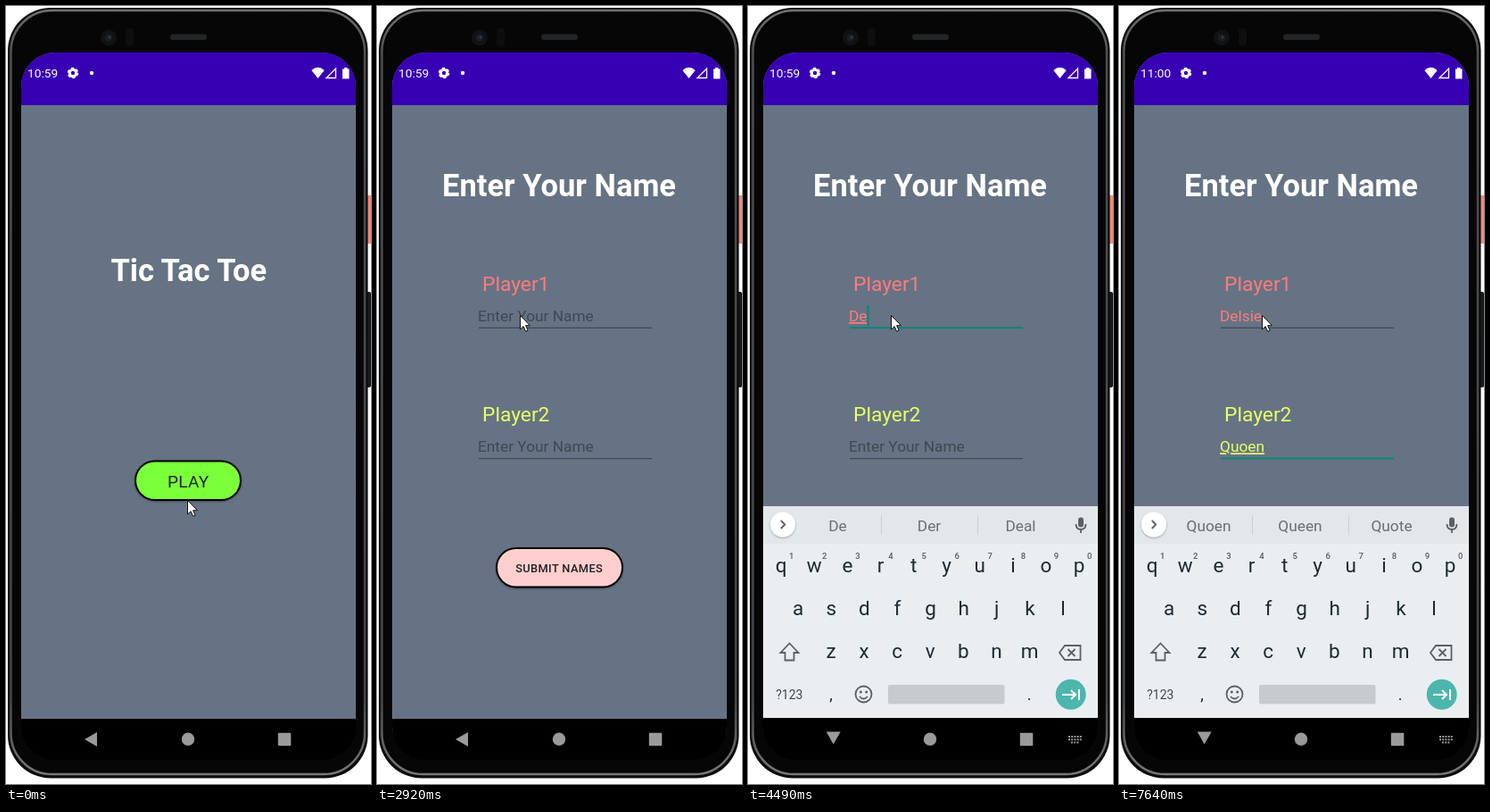
An HTML page for the animation above (8000 ms loop, 409x871 px).

```html
<!DOCTYPE html>
<html lang="en">
<head>
<meta charset="utf-8">
<title>Tic Tac Toe</title>
<style>
  html, body { margin: 0; width: 100%; height: 100%; overflow: hidden; background: #fff; }
  svg { display: block; width: 409px; height: 871px; font-family: Roboto, sans-serif; }
  .mid, .keys text { text-anchor: middle; }
  .title { font-size: 34.5px; font-weight: 700; fill: #fff; text-anchor: middle; }
  .label { font-size: 22.8px; }
  .entry, .hints { font-size: 17.3px; }
  .hint { fill: #3f4853; }
  .keys { font-size: 22.5px; fill: #1d2a31; }
  .keys .sup { font-size: 9.5px; font-weight: 500; fill: #555d62; }
  .keys .mark { font-size: 18px; }
  .icon { fill: none; stroke: #596166; stroke-width: 1.8; }
  .fillIcon { fill: #596166; stroke: none; }
  .hints { fill: #687075; }
  .window { transform-origin: 204.5px 433px; }
  .nav { fill: #9a9a9a; }
</style>
</head>
<body>
<svg viewBox="0 0 409 871">
  <defs>
    <linearGradient id="rim" x2="0" y2="1">
      <stop stop-color="#6d7173"/><stop offset=".06" stop-color="#4b4f52"/>
      <stop offset=".9" stop-color="#43474a"/><stop offset="1" stop-color="#777"/>
    </linearGradient>
    <clipPath id="screen"><rect x="17" y="52" width="375" height="792" rx="38"/></clipPath>
    <filter id="shadow" x="-20%" y="-20%" width="140%" height="160%">
      <feDropShadow dx="0" dy="1" stdDeviation=".9" flood-opacity=".35"/>
    </filter>
    <g id="backdrop">
      <path fill="#667384" d="M17 52h375v746H17z"/>
      <path fill="#3700b3" d="M17 52h375v59H17z"/>
      <path d="M17 798h375v46H17z"/>
    </g>
  </defs>

  <!-- phone body -->
  <rect x="404" y="212" width="6" height="54" rx="1" fill="#f28b78"/>
  <rect x="403" y="320" width="6" height="107" rx="2" fill="#17191a"/>
  <rect x="2" y="2" width="403.500" height="862.500" rx="48" fill="#0b0c0d"/>
  <rect x="5.500" y="5" width="396.500" height="855" rx="46" fill="#060606" stroke="url(#rim)" stroke-width="2.500"/>
  <rect x="17" y="52" width="375" height="792" rx="38"/>
  <circle cx="115" cy="35.500" r="9" fill="#111214"/>
  <circle cx="115" cy="35.500" r="4" fill="#1b1e23"/>
  <circle cx="116" cy="35" r="1.500" fill="#363b43"/>
  <rect x="134" y="25" width="9" height="20" rx="4" fill="#0e0e0f"/>
  <rect x="184" y="31.500" width="41" height="6.500" rx="3.200" fill="#222425"/>

  <g clip-path="url(#screen)">
    <g id="home" class="window">
      <use href="#backdrop"/>
      <text class="title" x="204.800" y="308">Tic Tac Toe</text>
      <rect x="145" y="509.500" width="118" height="43.500" rx="21.700" fill="#7bff3b" stroke="#000" stroke-width="2" filter="url(#shadow)"/>
      <text class="mid" x="204.200" y="538.800" font-size="19" fill="#20231f" letter-spacing=".3">PLAY</text>
    </g>
    <g id="form" class="window">
      <use href="#backdrop"/>
      <text class="title" x="204" y="213">Enter Your Name</text>
      <g id="fields"></g>
      <rect x="134" y="607" width="141" height="43.500" rx="21.700" fill="#ffcfcf" stroke="#000" stroke-width="2" filter="url(#shadow)"/>
      <text class="mid" x="204.200" y="633.800" font-size="12.800" font-weight="500" fill="#241f22" letter-spacing=".4">SUBMIT NAMES</text>
    </g>

    <g fill="#fff">
      <text id="clock" x="24" y="80.200" font-size="13.700"></text>
      <circle cx="75" cy="75" r="3.700" fill="none" stroke="#fff" stroke-width="3"/>
      <circle cx="75" cy="75" r="5.300" fill="none" stroke="#fff" stroke-width="2" stroke-dasharray="3.200 2.350"/>
      <circle cx="96" cy="75" r="2.200"/>
      <path d="M342.300 72Q349.500 65.500 356.700 72L349.500 81z"/>
      <path d="M369.500 70v10.500H359z" fill="none" stroke="#fff" stroke-width="1.300"/>
      <path d="M379 69h3.500v1.500h2v11h-7.500v-11h2z"/>
    </g>

    <g id="keyboard" class="keys">
      <path d="M17 797h375v47H17z" fill="#000"/>
      <path fill="#eaeef1" d="M17 560h375v237H17z"/>
      <path fill="#e3e7ea" d="M17 560h375v42H17z"/>
      <g id="letters"></g>
      <text x="46.300" y="776" font-size="14" fill="#40494f">?123</text>
      <text class="mark" x="93" y="777">,</text>
      <text class="mark" x="315" y="777">.</text>
      <rect x="157" y="760" width="130.500" height="21.500" rx="2" fill="#c7cbce"/>
      <g class="icon">
        <path d="M46.500 713.500l10 10.500h-5v8.500h-10V724h-5z"/>
        <path d="M355 716h17.500v16H355l-6-8zM358.500 720l8 8m0-8l-8 8"/>
        <circle cx="129.500" cy="770.500" r="9"/>
        <path d="M125 773q4.500 5 9 0"/>
        <circle class="fillIcon" cx="126.300" cy="768" r="1.500"/>
        <circle class="fillIcon" cx="132.700" cy="768" r="1.500"/>
        <rect class="fillIcon" x="370" y="572.500" width="6" height="11" rx="3"/>
        <path d="M367.500 580q0 6 5.500 6t5.500-6M373 586v4"/>
      </g>
      <circle cx="361.700" cy="770.700" r="17" fill="#4db6ac"/>
      <path d="M352 771h15m-5-5l5 5-5 5M371 765v12" fill="none" stroke="#fff" stroke-width="2"/>
      <circle cx="39" cy="580.500" r="14" fill="#fff" filter="url(#shadow)"/>
      <path id="chevron" class="icon" d="M36.800 576l4.500 4.500-4.500 4.500"/>
      <g id="tools" class="icon">
        <circle cx="87" cy="579" r="5"/><path d="M90.500 583l6 6"/>
        <path d="M138 574h11v9l-5 5h-8v-12q0-2 2-2zM149 583h-5v5M140 581q2.500 3 5 0M140 577v1m5-1v1"/>
        <text class="fillIcon" x="197" y="584.800" font-size="11.500" font-weight="900" letter-spacing="1">GIF</text>
        <path class="fillIcon" d="M245 574h15v15h-15z"/>
        <path d="M286 570v22" stroke="#cdd1d4" stroke-width="1"/>
        <path d="M314 581h.1m5.900 0h.1m5.900 0h.1" stroke-width="4" stroke-linecap="round"/>
      </g>
      <g id="hints" class="hints">
        <path d="M149.500 570v22M257.500 570v22" stroke="#cdd1d4"/>
        <text x="100.500" y="587.500"></text>
        <text x="203" y="587.500"></text>
        <text x="305.500" y="587.500"></text>
      </g>
    </g>

    <g class="nav">
      <path id="back" d="M88 821l14-8v16z"/>
      <circle cx="204" cy="820.800" r="7.200"/>
      <rect x="304.800" y="813.800" width="14.500" height="14.500" rx="1"/>
      <path id="imeIcon" fill="none" stroke="#9a9a9a" stroke-width="2" d="M359 818h15m-15 3.200h15M362 824.500h9" stroke-dasharray="2 1.200"/>
    </g>
  </g>

  <path id="pointer" d="M.5.500v15.500l3.600-3.300 2.500 5.600 2.500-1.100-2.500-5.500h4.800z" fill="#fff" stroke="#111"/>
</svg>

<script>
const LOOP = 8000;
const $ = id => document.getElementById(id);
const show = (node, on) => node.style.display = on ? '' : 'none';

$('fields').innerHTML = [['Player1', 319, '#ff7b7b'], ['Player2', 465.3, '#e8ff67']].map(([name, y, color]) => `
  <g fill="${color}">
    <text class="label" x="118" y="${y}">${name}</text>
    <text class="entry" x="113" y="${y + 34}"></text>
    <path class="rule" d="M114 ${y + 41.3}h194"/>
    <path class="caret" d="M0 ${y + 16}v23" stroke="#0c8577" stroke-width="2"/>
  </g>`).join('');

const rows = [['qwertyuiop', 37.2, 634], ['asdfghjkl', 56.2, 682], ['zxcvbnm', 93, 730]];
$('letters').innerHTML = rows.map(([row, left, y], r) => [...row].map((key, i) => {
  const x = left + i * 37.1;
  const digit = r ? '' : `<text class="sup" x="${x + 11.5}" y="618.500">${(i + 1) % 10}</text>`;
  return `<text x="${x}" y="${y}">${key}</text>${digit}`;
}).join('')).join('');

const fields = [...$('fields').children].map(group => ({
  entry: group.querySelector('.entry'),
  rule: group.querySelector('.rule'),
  caret: group.querySelector('.caret'),
}));
const hintTexts = $('hints').querySelectorAll('text');

const initial = {
  pointer: [203, 553], clock: '10:59', homeScale: 1, homeDim: 1, formScale: 1, formAlpha: 0,
  focus: -1, tint: 1, caret: false, names: ['', ''], composing: false,
  navTurn: 0, keyboard: false, strip: 'tools', hints: [],
};
const typed = (first, second, hints) =>
  ({ names: [first, second], caret: true, composing: true, strip: 'hints', hints: hints.split(' ') });

// Each step changes part of the state from its time on.
const steps = [
  [120, { pointer: [203, 550] }],
  [240, { pointer: [204, 542] }],
  [360, { pointer: [205, 536] }],
  [1740, { homeScale: 1.025, homeDim: .8, formScale: .93, formAlpha: .8 }],
  [1860, { homeScale: 1.05, homeDim: .65, formScale: .988, formAlpha: 1 }],
  [2010, { formScale: .997 }],
  [2130, { formScale: 1 }],
  [2500, { pointer: [145, 419] }],
  [2650, { pointer: [158, 353] }],
  [2770, { pointer: [159, 349] }],
  [2920, { pointer: [160, 346] }],
  [3070, { focus: 0, tint: .5 }],
  [3200, { tint: 1, caret: true }],
  [3350, { navTurn: .5 }],
  [3480, { navTurn: 1 }],
  [3630, { keyboard: true, caret: false }],
  [4120, { names: ['D', ''], caret: true, composing: true, strip: '' }],
  [4240, typed('D', '', 'D Do Did')],
  [4490, typed('De', '', 'De Der Deal')],
  [4740, typed('Del', '', 'Del Deli Delay')],
  [4890, typed('Dels', '', 'Dels Does Deals')],
  [5140, typed('Delsi', '', 'Delsi Deals Design')],
  [5260, typed('Delsie', '', 'Delsie Desire Denise')],
  [5670, { caret: false }],
  [5950, { focus: 1, caret: true, composing: false, strip: '' }],
  [6070, { strip: 'tools' }],
  [6320, { caret: false }],
  [6570, { clock: '11:00', names: ['Delsie', 'Q'], caret: true, composing: true, strip: '' }],
  [6690, typed('Delsie', 'Q', 'Q Quiet Quite')],
  [6810, typed('Delsie', 'Qu', 'Qu Quit Quite')],
  [6960, typed('Delsie', 'Quo', 'Quo Quote Quota')],
  [7090, typed('Delsie', 'Quoe', 'Quoe Quote Queue')],
  [7210, typed('Delsie', 'Quoen', 'Quoen Queen Quote')],
  [7640, { caret: false }],
];

function drawField({ entry, rule, caret }, index, state) {
  const name = state.names[index];
  const focused = state.focus === index;
  entry.textContent = name || 'Enter Your Name';
  entry.classList.toggle('hint', !name);
  entry.style.textDecoration = focused && state.composing ? 'underline' : '';
  rule.setAttribute('stroke', focused ? (state.tint < 1 ? '#27685f' : '#0c8577') : '#414a55');
  rule.setAttribute('stroke-width', focused ? 1 + state.tint : 1.2);
  show(caret, focused && state.caret);
  const end = name ? entry.getComputedTextLength() : 1;
  caret.setAttribute('transform', `translate(${114 + end})`);
}

function draw(state) {
  $('pointer').setAttribute('transform', `translate(${state.pointer})`);
  $('clock').textContent = state.clock;
  $('home').style.transform = `scale(${state.homeScale})`;
  $('home').style.opacity = state.homeDim;
  $('form').style.transform = `scale(${state.formScale})`;
  $('form').style.opacity = state.formAlpha;
  fields.forEach((field, i) => drawField(field, i, state));
  $('back').setAttribute('transform', `rotate(${-90 * state.navTurn} 94.6 819.9)`);
  $('imeIcon').style.opacity = state.navTurn;
  show($('keyboard'), state.keyboard);
  show($('tools'), state.strip === 'tools');
  show($('hints'), state.strip === 'hints');
  $('chevron').setAttribute('transform', state.strip === 'tools' ? 'matrix(-1 0 0 1 78 0)' : '');
  hintTexts.forEach((text, i) => text.textContent = state.hints[i] || '');
}

let start, shown = -1;
function tick(now) {
  start ??= now;
  const time = (now - start) % LOOP;
  const past = steps.filter(([at]) => at <= time);
  if (past.length !== shown) {
    shown = past.length;
    draw(Object.assign({}, initial, ...past.map(([, change]) => change)));
  }
  requestAnimationFrame(tick);
}
draw(initial);
requestAnimationFrame(tick);
</script>
</body>
</html>
```
